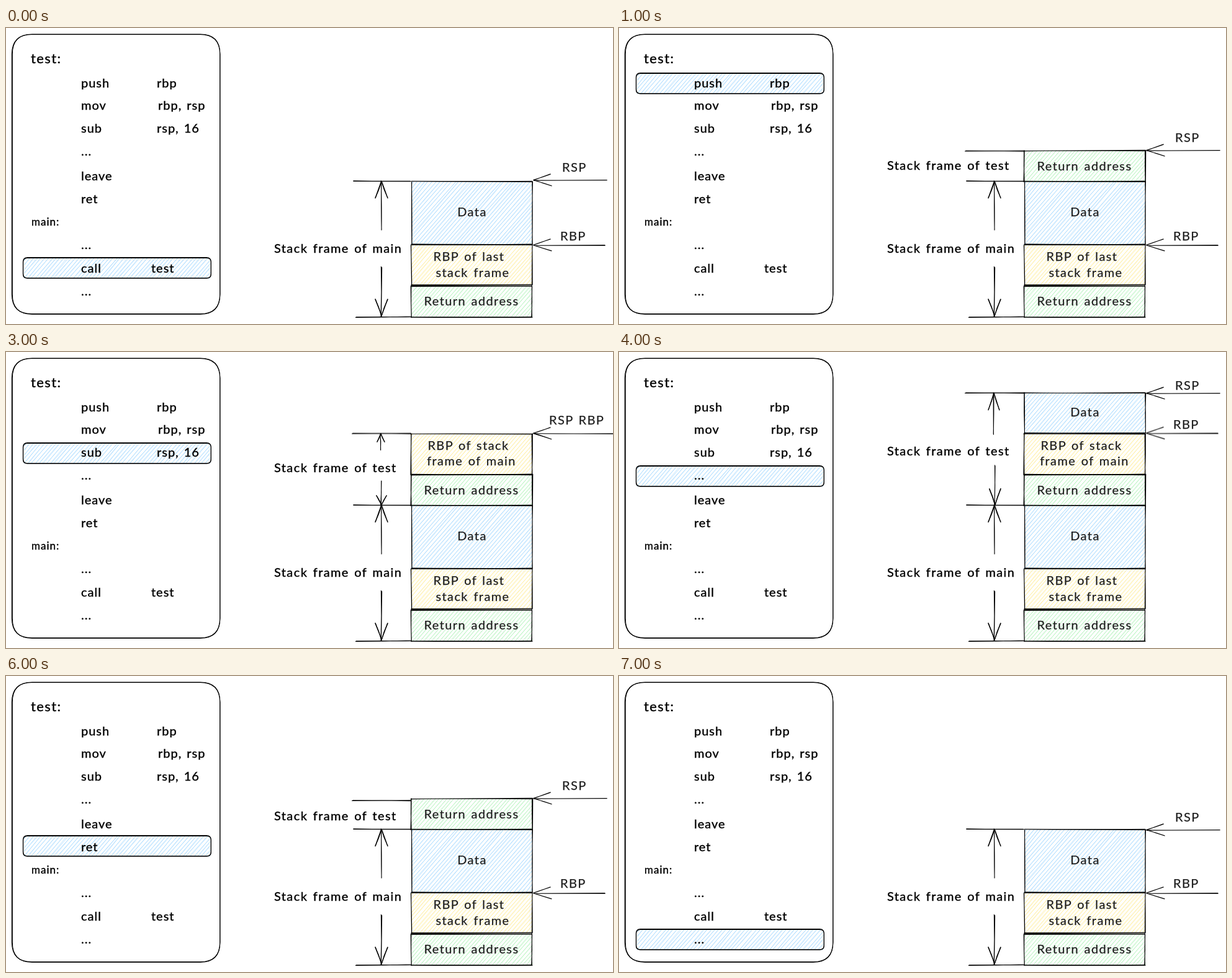
Write an HTML page that moves like this. It is 978 by 478 pixels and loops after 9500 ms.

```html
<!DOCTYPE html>
<html lang="en">
<head>
<meta charset="utf-8">
<title>Stack frames during a call</title>
<style>
  html, body { margin: 0; width: 100%; height: 100%; overflow: hidden; background: #fff; }
  svg { display: block; width: 978px; height: 478px; }
  path { fill: none; stroke: #000; stroke-width: 1.1; stroke-linecap: round; stroke-linejoin: round; }
  text {
    font: 20px Lato, "Open Sans", sans-serif; letter-spacing: 1.4px; word-spacing: 2px;
    fill: #000; stroke: #000; stroke-width: .4px; white-space: pre;
  }
  .code { letter-spacing: 1px; }
  .inside { fill: #1e1e1e; stroke: #1e1e1e; stroke-width: .25px; }
</style>
</head>
<body>
<svg id="stage" viewBox="0 0 978 478"></svg>
<script>
const LOOP = 9500;
const STARTS = [0, 1000, 2000, 3000, 4000, 5000, 6000, 7000];
const BLUE = '#a5d8ff', YELLOW = '#ffec99', GREEN = '#b2f2bb';
const stage = document.getElementById('stage');
const startTime = document.timeline.currentTime || 0;

let seed = 7;
function random() {
  seed = (seed * 16807) % 2147483647;
  return seed / 2147483647;
}
const jitter = amount => (random() * 2 - 1) * amount;

function add(parent, tag, attrs, content) {
  const el = document.createElementNS('http://www.w3.org/2000/svg', tag);
  for (const key in attrs) el.setAttribute(key, attrs[key]);
  if (content) el.textContent = content;
  parent.appendChild(el);
  return el;
}
const group = () => add(stage, 'g', {});

// Hand-drawn stroke: two slightly bowed passes.
function line(parent, x1, y1, x2, y2, wobble = 0.8) {
  let d = '';
  for (let pass = 0; pass < 2; pass++) {
    const j = () => jitter(wobble);
    d += `M${x1 + j()} ${y1 + j()}Q${(x1 + x2) / 2 + j()} ${(y1 + y2) / 2 + j()} ${x2 + j()} ${y2 + j()}`;
  }
  return add(parent, 'path', { d });
}

function roundRect(parent, x, y, w, h, r) {
  for (let pass = 0; pass < 2; pass++) {
    const l = x + jitter(0.6), t = y + jitter(0.6);
    const R = x + w + jitter(0.6), b = y + h + jitter(0.6);
    add(parent, 'path', {
      d: `M${l + r} ${t}L${R - r} ${t}Q${R} ${t} ${R} ${t + r}L${R} ${b - r}Q${R} ${b} ${R - r} ${b}` +
         `L${l + r} ${b}Q${l} ${b} ${l} ${b - r}L${l} ${t + r}Q${l} ${t} ${l + r} ${t}`
    });
  }
}

// Diagonal strokes rising at 49 degrees, cut to the rectangle.
function hatch(parent, x, y, w, h, color) {
  const slope = Math.tan(49 * Math.PI / 180);
  const spacing = 4.6 / Math.sin(49 * Math.PI / 180);
  let d = '';
  for (let foot = spacing / 2; foot < w + h / slope; foot += spacing) {
    const right = Math.min(foot, w), left = Math.max(0, foot - h / slope);
    const rise = px => y + (foot - px) * slope;
    for (let pass = 0; pass < 2; pass++) {
      const j = () => jitter(0.9);
      d += `M${x + left + j()} ${rise(left) + j()}L${x + right + j()} ${rise(right) + j()}`;
    }
  }
  add(parent, 'path', { d, style: `stroke:${color};stroke-width:.7` });
}

function box(parent, x, y, w, h, color) {
  hatch(parent, x, y, w, h, color);
  line(parent, x, y, x + w, y);
  line(parent, x + w, y, x + w, y + h);
  line(parent, x, y + h, x + w, y + h);
  line(parent, x, y, x, y + h);
}

const text = (parent, x, y, content, attrs = {}) => add(parent, 'text', { x, y, ...attrs }, content);
const centered = (parent, x, y, content) =>
  text(parent, x, y, content, { 'text-anchor': 'middle', class: 'inside' });

function verticalArrow(parent, x, tail, tip, length = 27, spread = 10) {
  const back = tip + Math.sign(tail - tip) * length;
  line(parent, x, tail, x - 0.5, tip);
  for (const side of [-spread, spread]) {
    add(parent, 'path', { d: `M${x + side} ${back}Q${x + side * 0.35} ${(back + tip) / 2} ${x} ${tip}` });
    line(parent, x + side, back, x, tip, 0.4);
  }
}

// Pointer to the stack, drawn at height zero.
function pointer(parent, end) {
  line(parent, end, 0, 851, 0, 0.4);
  line(parent, 877, -10, 850, -0.5, 0.4);
  line(parent, 879, 9, 850, -0.5, 0.4);
}

// One height per step; null hides the element.
function follow(el, heights) {
  const frames = heights.map((y, i) => ({
    offset: STARTS[i] / LOOP,
    transform: `translate(0px, ${y ?? 0}px)`,
    opacity: y === null ? 0 : 1,
    easing: 'step-end'
  }));
  frames.push({ ...frames[frames.length - 1], offset: 1 });
  el.animate(frames, { duration: LOOP, iterations: Infinity }).startTime = startTime;
}
const during = (el, first, last) =>
  follow(el, STARTS.map((_, i) => i >= first && i <= last ? 0 : null));

// Code panel
roundRect(stage, 10, 10, 335, 452, 32);
const highlight = group();
hatch(highlight, 29, 1, 300, 32, BLUE);
roundRect(highlight, 28, 0, 302, 33, 7);
follow(highlight, [371, 73, 110, 147, 184, 220, 258, 409]);

text(stage, 40, 57, 'test:', { style: 'font-size:22px' });
text(stage, 41, 319, 'main:', { style: 'font-size:17px', class: 'code' });
const code = [
  [96, 'push', 243, 'rbp'], [132, 'mov', 245, 'rbp, rsp'], [169, 'sub', 243, 'rsp, 16'],
  [206, '...'], [246, 'leave'], [283, 'ret'],
  [357, '...'], [395, 'call', 234, 'test'], [432, '...']
];
for (const [y, op, x, args] of code) {
  text(stage, 121, y, op, { class: 'code' });
  if (args) text(stage, x, y, args, { class: 'code' });
}

// Frame of main
box(stage, 653, 417, 194.5, 50, GREEN);
box(stage, 653, 350, 195, 65, YELLOW);
box(stage, 653.5, 248, 194.5, 101.5, BLUE);
centered(stage, 751, 304, 'Data');
centered(stage, 746, 376, 'RBP of last');
centered(stage, 752, 402, 'stack frame');
centered(stage, 750, 448, 'Return address');
text(stage, 432, 363, 'Stack frame of main');
line(stage, 560, 247, 652, 247.5);
line(stage, 564, 467, 652, 466.5);
verticalArrow(stage, 605, 326, 247.5);
verticalArrow(stage, 605, 386, 465);

// Frame of test
const returnSlot = group();
box(returnSlot, 652.5, 198, 195.5, 50, GREEN);
centered(returnSlot, 750, 230, 'Return address');
during(returnSlot, 1, 6);

const savedSlot = group();
box(savedSlot, 652.5, 132, 195.5, 66, YELLOW);
centered(savedSlot, 745, 158, 'RBP of stack');
centered(savedSlot, 750, 183, 'frame of main');
during(savedSlot, 2, 5);

const dataSlot = group();
box(dataSlot, 653, 66, 195, 65, BLUE);
centered(dataSlot, 751, 104, 'Data');
during(dataSlot, 4, 5);

const shortArrows = group();
verticalArrow(shortArrows, 604, 158, 132, 13, 6);
verticalArrow(shortArrows, 605, 208, 247, 15, 8);
during(shortArrows, 2, 3);

const longArrows = group();
verticalArrow(longArrows, 604, 133, 66.5, 27, 9);
verticalArrow(longArrows, 606, 183, 247, 26, 9);
during(longArrows, 4, 5);

const topEdge = group();
line(topEdge, 558, 0, 652, 0.5);
follow(topEdge, [null, 198.5, 131.5, 131.5, 66, 66, 201, null]);
follow(text(stage, 432, 0, 'Stack frame of test'), [null, 229, 194, 194, 167, 167, 233, null]);

// Registers
const rsp = group();
pointer(rsp, 968);
follow(rsp, [246, 198, 132, null, 67, 67, 198, 249]);
follow(text(stage, 896, 0, 'RSP', { class: 'inside' }), [232, 184, 117, null, 61, 61, 184, 235]);

const rbp = group();
pointer(rbp, 965);
follow(rbp, [351, 351, 351, null, 131.5, 131.5, 351, 351]);
follow(text(stage, 893, 0, 'RBP', { class: 'inside' }), [343, 343, 343, null, 124, 124, 342, 342]);

const both = group();
pointer(both, 978);
text(both, 875, -15, 'RSP RBP', { class: 'inside' });
follow(both, [null, null, null, 132, null, null, null, null]);
</script>
</body>
</html>
```
